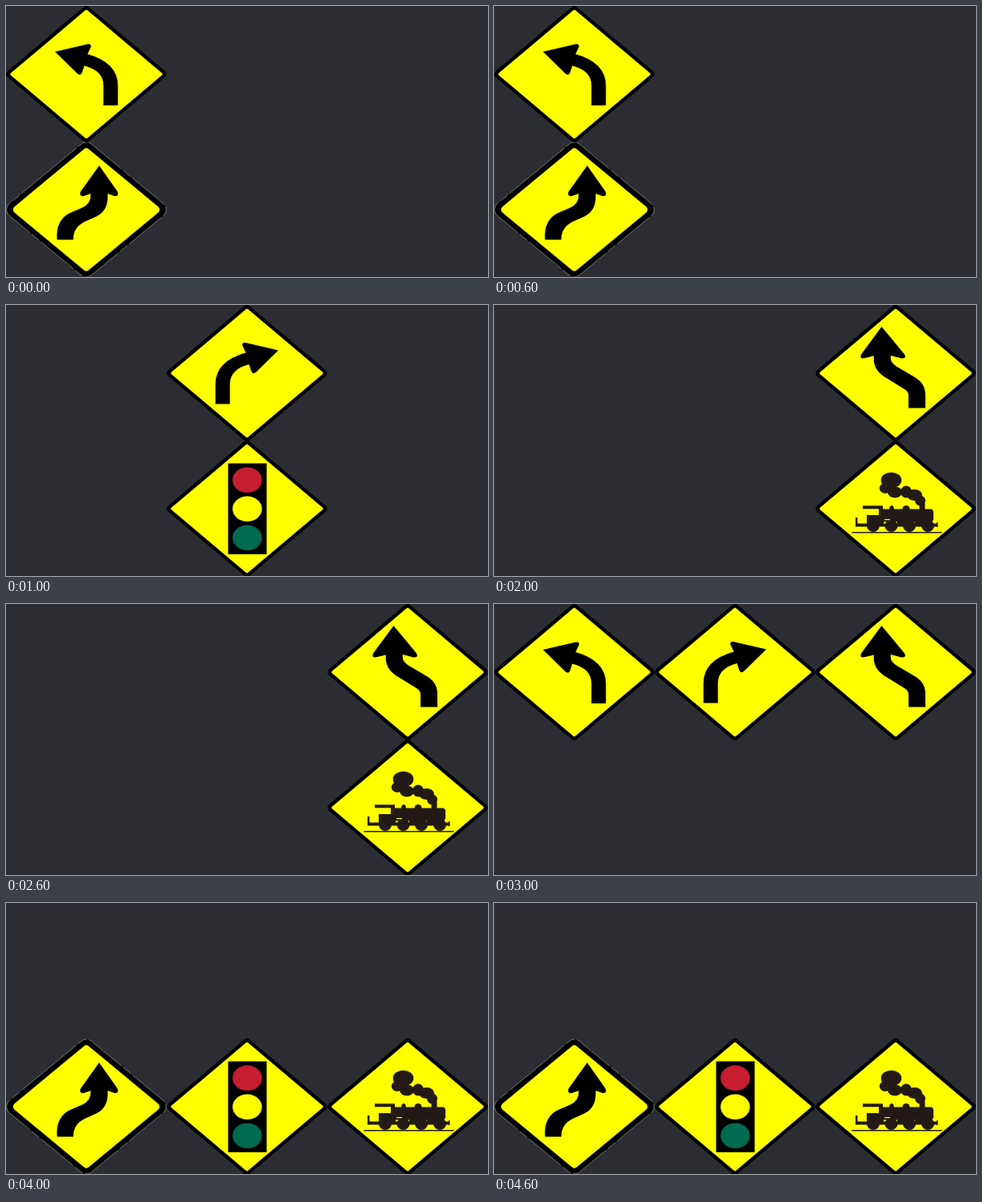
These frames come from a looping animation (600 by 338 pixels, 5 s). An HTML page with a canvas:

```html
<!DOCTYPE html>
<html lang="en">
<head>
<meta charset="utf-8">
<title>Road signs</title>
<style>
html, body { margin: 0; width: 100%; height: 100%; overflow: hidden; background: #2c2d32; }
canvas { display: block; width: 600px; height: 338px; }
</style>
</head>
<body>
<canvas id="stage" width="600" height="338"></canvas>
<script>
const ctx = document.getElementById('stage').getContext('2d');
const BACK = '#2c2d32', YELLOW = '#ffff00', BLACK = '#000', SOOT = '#231a17';
const CELL_W = 200, CELL_H = 169, STEP = 1000;

// Signs 0-2 fill the top row, 3-5 the bottom row.
const scenes = [[0, 3], [1, 4], [2, 5], [0, 1, 2], [3, 4, 5]];

const bend = new Path2D(
  'M61 57 L102 47.5 Q107 47 105.5 51.5 L101.5 60 Q139 70.5 139.3 99 V124 H121.3 V99 ' +
  'Q121 80.5 97.5 74.5 L94.5 83.5 Q93 87.5 88.5 84 Z');
const winding = new Path2D(
  'M82.5 27 L111 61.5 Q114 67 107 66.5 L94 63 Q92 70 100 76 L122 89 ' +
  'Q137 97 137 112 V128.5 H116 V113 Q116 108 111 105 L85 89 Q71 79 73 63.5 ' +
  'L60 66.5 Q54 66.5 57.5 61 Z');
const reverse = new Path2D(
  'M116 30 L138.5 62 Q141.5 68.5 135 68 L126.5 65 Q128 86 112.5 93.5 L98 100 ' +
  'Q83.5 107 83.8 122.5 H63.5 Q61.5 97 81 88.5 L95 82.5 Q106 77.5 105.5 65 ' +
  'L97 68 Q91 69 92.5 63 Z');

function diamond(w, h, r) {
  const cx = CELL_W / 2, cy = 85;
  const p = [[cx, cy - h], [cx + w, cy], [cx, cy + h], [cx - w, cy]];
  ctx.beginPath();
  ctx.moveTo(cx - w / 2, cy - h / 2);
  p.forEach(([x, y], i) => {
    const [nx, ny] = p[(i + 1) % 4];
    ctx.arcTo(x, y, nx, ny, r);
  });
  ctx.closePath();
}

function plate(thick) {
  ctx.fillStyle = BLACK;
  if (thick) {
    diamond(105, 87, 10);
    ctx.fill();
    ctx.strokeStyle = 'rgba(225,225,225,0.6)';
    ctx.lineWidth = 0.8;
    ctx.setLineDash([52, 3, 12, 3]);
    ctx.stroke();
    ctx.setLineDash([]);
    diamond(94, 78, 5);
  } else {
    diamond(102.5, 86.5, 5);
    ctx.fill();
    diamond(95.5, 80.7, 1.5);
  }
  ctx.fillStyle = YELLOW;
  ctx.fill();
  ctx.fillStyle = BLACK;
}

function oval(x, y, rx, ry = rx) {
  ctx.beginPath();
  ctx.ellipse(x, y, rx, ry, 0, 0, Math.PI * 2);
  ctx.fill();
}

function lights() {
  ctx.fillRect(76.5, 28.5, 48, 113.3);
  ['#c61d30', '#fffc00', '#006b4f'].forEach((color, i) => {
    ctx.fillStyle = color;
    oval(100.3, 49.3 + 36 * i, 18.3, 15.7);
  });
}

function train() {
  ctx.fillStyle = SOOT;
  const box = (x, y, w, h) => ctx.fillRect(x, y, w, h);
  // smoke
  oval(94.5, 49.5, 12.8, 9.8);
  oval(87, 59.5, 7.2, 6.5);
  oval(99, 64.5, 9, 7);
  oval(113, 64, 7, 7.5);
  oval(123.5, 68, 9.5, 7);
  oval(130.5, 75, 6.5, 6.5);
  // cab, boiler, chimney
  box(59, 81.3, 25, 4);
  box(79, 84, 5, 10);
  box(64, 93, 21, 12);
  ctx.beginPath();
  ctx.roundRect(82, 85.5, 65, 16, [0, 4, 4, 0]);
  ctx.fill();
  oval(95, 86, 3, 5);
  oval(113, 85.5, 4.5, 4.5);
  box(129.5, 78, 7, 9);
  // frame and buffers
  box(50, 96, 2.5, 11);
  box(50, 103.5, 102, 4);
  box(102, 100, 14, 4);
  box(124, 100, 20, 4);
  box(151, 102, 1.5, 6);
  for (const x of [72, 94.5, 117, 140]) oval(x, 106.5, 8, 7.5);
  ctx.fillStyle = YELLOW;
  box(86, 98, 7, 1.2);
  ctx.fillStyle = SOOT;
  box(45.5, 114, 112, 1.5);
}

function drawSign(n) {
  ctx.save();
  ctx.translate((n % 3) * CELL_W, Math.floor(n / 3) * CELL_H);
  plate(n === 3);
  if (n === 0) ctx.fill(bend);
  if (n === 1) {
    ctx.translate(CELL_W, -0.5);
    ctx.scale(-1, 1);
    ctx.fill(bend);
  }
  if (n === 2) ctx.fill(winding);
  if (n === 3) ctx.fill(reverse);
  if (n === 4) lights();
  if (n === 5) train();
  ctx.restore();
}

function draw(now) {
  ctx.fillStyle = BACK;
  ctx.fillRect(0, 0, 600, 338);
  scenes[Math.floor(now / STEP) % scenes.length].forEach(drawSign);
}

const start = performance.now();
function tick() {
  draw(performance.now() - start);
  requestAnimationFrame(tick);
}
tick();
</script>
</body>
</html>
```
